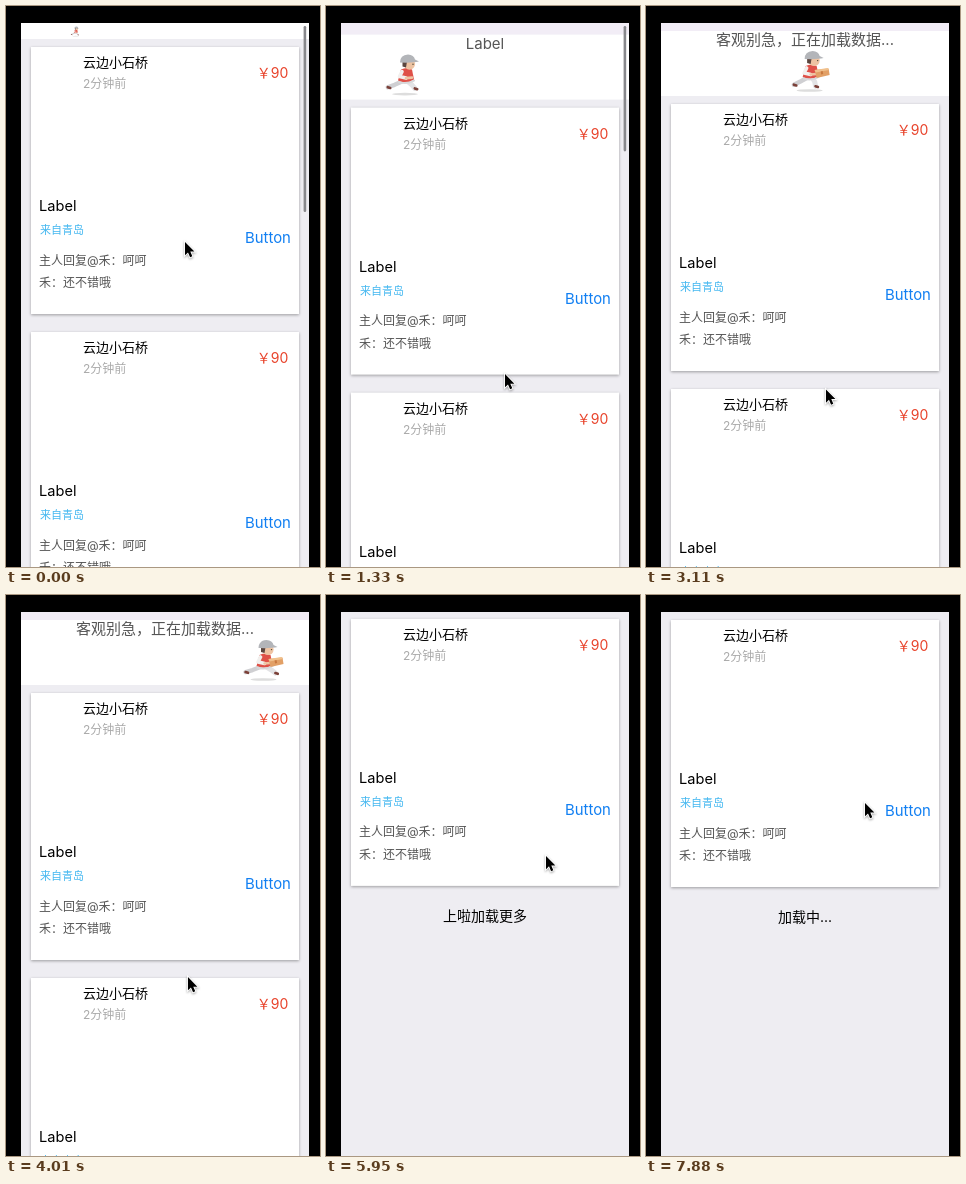
These frames come from a looping animation (314 by 561 pixels, 8 s). An HTML page:

```html
<!DOCTYPE html>
<html lang="zh-CN">
<head>
<meta charset="utf-8">
<style>
html, body { margin: 0; width: 100%; height: 100%; overflow: hidden; background: #000; }
body > svg { display: block; width: 314px; height: 561px; }
text { font-family: Inter, "Noto Sans CJK SC", "Noto Sans CJK", sans-serif; }
.mid { text-anchor: middle; }
.panel { filter: drop-shadow(.6px 1px 1.7px rgba(0,0,0,.35)); }
.limb { fill: none; stroke-linecap: round; stroke-linejoin: round; }
</style>
</head>
<body>
<svg viewBox="0 0 314 561">
  <defs>
    <g id="card">
      <rect class="panel" x="25" width="268" height="267" fill="#fff"/>
      <text x="77" y="20" font-size="13">云边小石桥</text>
      <text x="77" y="41" font-size="12" fill="#aaa">2分钟前</text>
      <text x="250.8" y="31" font-size="14" fill="#e8432b">￥90</text>
      <text x="33" y="164.2" font-size="14.6">Label</text>
      <text x="34" y="187" font-size="11" fill="#43b7f0">来自青岛</text>
      <text x="239" y="196.2" font-size="14.9" fill="#117ff2">Button</text>
      <g font-size="12" fill="#555">
        <text x="33" y="217.5">主人回复@禾：呵呵</text>
        <text x="33" y="240">禾：还不错哦</text>
      </g>
    </g>
  </defs>

  <svg x="15" y="17" width="288" height="544" viewBox="15 17 288 544">
    <rect x="15" y="17" width="288" height="544" fill="#eeedf2"/>
    <g id="list">
      <g id="header" transform="translate(0 -73)">
        <rect x="15" y="-60" width="288" height="60" fill="#f2edf6"/>
        <rect x="15" width="288" height="65" fill="#fff"/>
        <text id="hint" class="mid" x="159" y="14.2" font-size="15" fill="#555"></text>
        <g id="runner">
          <ellipse cx="17" cy="37.5" rx="13" ry="1.3" fill="#ddd"/>
          <path id="backLeg" class="limb" stroke="#cfcfd2" stroke-width="4.4"/>
          <path id="backShoe" class="limb" stroke="#7b4038" stroke-width="2.6"/>
          <path id="frontLeg" class="limb" stroke="#e3e3e5" stroke-width="5"/>
          <path id="frontShoe" class="limb" stroke="#7b4038" stroke-width="2.6"/>
          <path d="M13 13Q19 10 24 13L26 23Q19 28 10 24Z" fill="#df5148"/>
          <path d="M11 25.5Q19 28 26 24" class="limb" stroke="#d8d8da" stroke-width="2"/>
          <circle cx="21.5" cy="7.5" r="5.6" fill="#eec3a2"/>
          <path d="M14.5 10V5h4.5l-1 6z" fill="#5b463f"/>
          <path d="M12 6Q12 -1.5 20 -2Q26 -1.5 27 3L31 5Q25 6.5 12 6Z" fill="#b3b5b9"/>
          <circle cx="25" cy="7.6" r=".7" fill="#443"/>
          <path d="M14 15L11.5 20L18 21.5" class="limb" stroke="#f2f0ee" stroke-width="3.6"/>
          <path d="M18 21.5L24 21" class="limb" stroke="#eec3a2" stroke-width="2.6"/>
          <g id="parcel">
            <path d="M22 17L36 15.5L37 22L24 25Z" fill="#e2a066"/>
            <path d="M22 17L35 15L36.5 17L23 19.5Z" fill="#f0c08c"/>
            <path d="M28 18.5L30 18L30.6 21L28.6 21.5Z" fill="#c9793f"/>
          </g>
        </g>
      </g>
      <use href="#card"/>
      <use id="second" href="#card" y="285"/>
      <text id="footer" class="mid" x="159" y="302" font-size="14"></text>
    </g>
    <rect id="bar" x="297.6" y="20" width="2.6" rx="1.3" fill="#88888c"/>
  </svg>

  <path id="cursor" d="M0 0V13.2L3 10.4L5.1 15.2L7.3 14.2L5.3 9.6H9.4Z" stroke="#fff"
    paint-order="stroke" stroke-width="1.8" style="filter:drop-shadow(0 1px 1px rgba(0,0,0,.35))"/>
</svg>

<script>
const LOOP = 8000, STEP = 148;
const RELEASE = 1850, SETTLED = 2360, RELOAD = 4080, DRAG_UP = 5900, DROP = 6840;
const REST = 73, GRAB_TOP = 206, GRAB_BOTTOM = 263;

const $ = id => document.getElementById(id);
const set = (id, name, value) => $(id).setAttribute(name, value);
const mix = (a, b, k) => a + (b - a) * k;
const clamp = v => Math.max(0, Math.min(1, v));

function ease(t, from, to) {
  const k = clamp((t - from) / (to - from));
  return k * k * (3 - 2 * k);
}

// Linear interpolation over [time, value] pairs.
function along(t, keys) {
  let i = 1;
  while (i < keys.length - 1 && t > keys[i][0]) i++;
  const [t0, a] = keys[i - 1], [t1, b] = keys[i];
  return mix(a, b, clamp((t - t0) / (t1 - t0)));
}

// Resistance of an overscrolled list.
function rubber(d) {
  const x = Math.max(0, d) * 0.55;
  return x / (1 + x / 544);
}

const cursorX = t => along(t, [[0, 179], [1630, 179], [2220, 178], [4010, 182],
  [5040, 182], [DRAG_UP, 220], [7600, 220], [7844, 219]]);
const cursorY = t => along(t, [[0, 236], [740, 312], [1180, 368], [1630, 380], [2500, 380],
  [3200, 384], [4010, 382], [4736, 380], [5040, 380], [DRAG_UP, GRAB_BOTTOM],
  [6512, 200.5], [7600, 200.5], [7844, 208]]);
const runX = t => along(t, [[1930, 77], [2220, 83], [2500, 103], [2960, 146], [4010, 257], [4160, 273]]);

function pullDown(t) {
  if (t < RELEASE) return rubber(cursorY(t) - GRAB_TOP);
  const held = mix(rubber(380 - GRAB_TOP), REST, ease(t, RELEASE, SETTLED));
  return held * (1 - ease(t, RELOAD, 4720));
}

function pullUp(t) {
  if (t < DRAG_UP) return 0;
  return rubber(GRAB_BOTTOM - cursorY(Math.min(t, DROP))) * (1 - ease(t, DROP, 7260));
}

function leg(name, hip, near, far, s) {
  const [kx, ky, fx, fy] = near.map((v, i) => mix(v, far[i], s));
  set(name + "Leg", "d", `M${hip}L${kx} ${ky}L${fx} ${fy}`);
  set(name + "Shoe", "d", `M${fx} ${fy}l2.4 .8`);
}

function drawRunner(t, pull) {
  const running = t >= RELEASE;
  const size = clamp(pull / 65);
  const stride = running ? 0.5 - 0.5 * Math.cos((t - 2220) / 398 * 2 * Math.PI) : 0.8;
  const x = running ? runX(t) : 66.5 + 10.5 * size;
  set("runner", "transform", `translate(${x} ${61 + 2 * (1 - size)}) scale(${size}) translate(-15 -39)`);
  set("parcel", "opacity", running ? 1 : 0);
  leg("back", "14 25", [9, 29, 3, 33], [6, 28, -1, 30], stride);
  leg("front", "20 25", [20, 30, 18, 35], [25, 28, 29, 31], stride);
}

function draw(time) {
  const t = Math.floor(time % LOOP / STEP) * STEP;
  const pull = pullDown(t), lift = pullUp(t);
  const reloaded = t >= RELOAD;

  set("list", "transform", `translate(0 ${25 + pull - lift})`);
  set("header", "opacity", pull > 0 ? 1 : 0);
  $("hint").textContent = t < RELEASE ? "Label" : "客观别急，正在加载数据...";
  drawRunner(t, pull);

  set("second", "opacity", reloaded ? 0 : 1);
  set("footer", "opacity", reloaded ? 1 : 0);
  $("footer").textContent = t >= DROP ? "加载中..." : lift > 25 ? "松开加载更多" : "上啦加载更多";

  set("bar", "height", 202 - pull + 74 * ease(t, RELEASE, SETTLED));
  set("bar", "opacity", 1 - ease(t, 2300, 2750));
  set("cursor", "transform", `translate(${cursorX(t)} ${cursorY(t)})`);
}

const start = performance.now();
function tick() {
  draw(performance.now() - start);
  requestAnimationFrame(tick);
}
tick();
</script>
</body>
</html>
```
